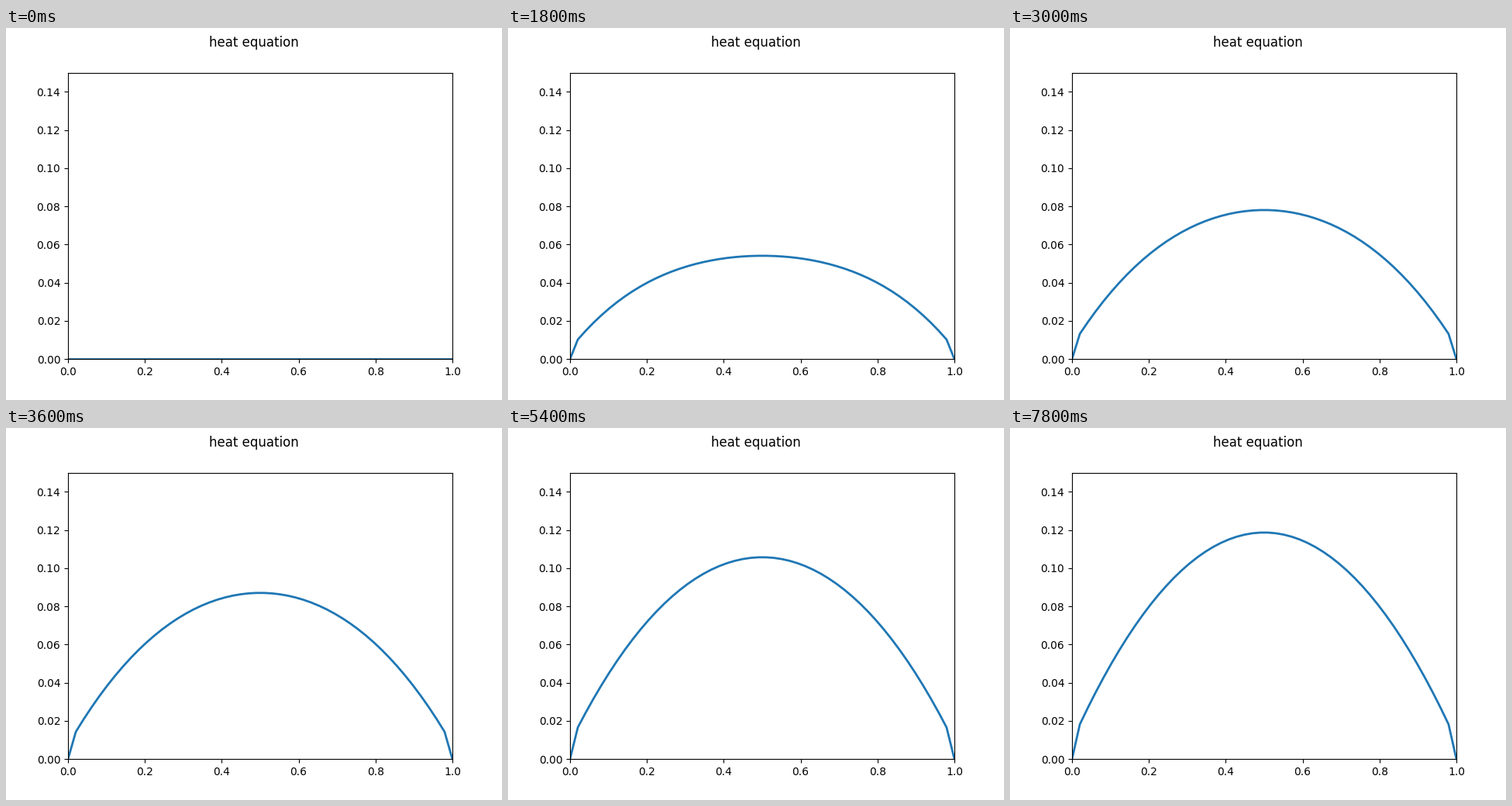
Recreate the animation shown at these times as a matplotlib script. Size 640 by 480 pixels, loop 8000 ms.

```python
import numpy as np
import matplotlib.pyplot as plt
from matplotlib.animation import FuncAnimation

NODES = 50
H = 1 / NODES
STEP_TIME = 0.01
TICK_MS = 100
TICKS_PER_STEP = 3
LOOP_MS = 8000

# Discrete Laplacian with zero walls one cell beyond the outer nodes.
laplacian = (2 * np.eye(NODES) - np.eye(NODES, k=1) - np.eye(NODES, k=-1)) / H**2
rates, modes = np.linalg.eigh(laplacian)
source = modes.T @ np.ones(NODES)


def temperature(t):
    """Solution of u' = -laplacian u + 1 from rest, with the ends pinned at 0."""
    u = modes @ (source * (1 - np.exp(-rates * t)) / rates)
    u[[0, -1]] = 0
    return u


fig, ax = plt.subplots(figsize=(6.4, 4.8), dpi=100)
fig.suptitle("heat equation")
ax.set_xlim(0, 1)
ax.set_ylim(0, 0.15)
x = np.linspace(0, 1, NODES)
line, = ax.plot(x, temperature(0), lw=2)


def update(tick):
    line.set_ydata(temperature(STEP_TIME * (tick // TICKS_PER_STEP)))
    return line,


anim = FuncAnimation(fig, update, frames=LOOP_MS // TICK_MS,
                     interval=TICK_MS, repeat=True, repeat_delay=0)
plt.show()
```
